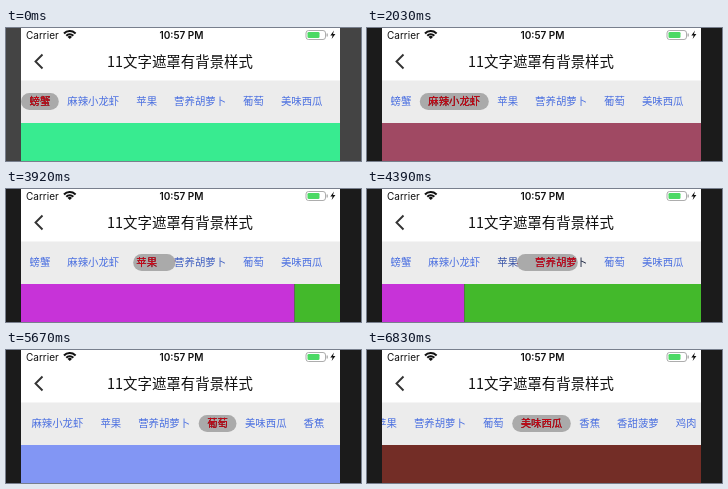
These frames come from a looping animation (355x133 px, 7.43 s). An HTML page with a canvas:

```html
<!DOCTYPE html>
<html lang="zh-CN">
<head>
<meta charset="utf-8">
<style>
  html, body { margin: 0; width: 100%; height: 100%; overflow: hidden; background: #1b1b1b; }
  canvas { display: block; width: 355px; height: 133px; }
</style>
</head>
<body>
<canvas></canvas>
<script>
const W = 355, H = 133, LOOP = 7430, TICK = 58;
const LEFT = 15, RIGHT = 334, VIEW = RIGHT - LEFT;
const CJK = '"Noto Sans CJK SC", "Noto Sans CJK", sans-serif';
const LATIN = 'Inter, sans-serif';
const PAGES = ['#38eb90', '#a04963', '#c733d8', '#43b92b', '#8296f4', '#732d26'];
const BLUE = [74, 111, 224];
const FONT = 10.4, GAP = 17, PAD = 8.5;

let nextX = LEFT + PAD;
const tabs = ['螃蟹', '麻辣小龙虾', '苹果', '营养胡萝卜', '葡萄', '美味西瓜', '香蕉', '香甜菠萝', '鸡肉']
  .map(label => {
    const tab = { label, x: nextX, w: label.length * FONT };
    nextX += tab.w + GAP;
    return tab;
  });

// Each move: start, steps, from, to, ease-out power
const swipes = [
  [1320, 5, 0, 0.31, 1.2], [1740, 6, 0.31, 1, 2.2],
  [2328, 3, 1, 1.364, 1.2], [3270, 1, 1.364, 1.42, 1], [3330, 6, 1.42, 2, 2.2],
  [3920, 3, 2, 2.37, 1.2], [4330, 6, 2.37, 3, 2.2],
  [4848, 5, 3, 3.32, 1.2], [5320, 6, 3.32, 4, 2.2],
  [5848, 5, 4, 4.33, 1.2], [6200, 6, 4.33, 5, 2.2]
];
const centered = i => tabs[i].x + tabs[i].w / 2 - (LEFT + RIGHT) / 2;
const scrolls = [
  [4670, 6, 0, centered(3), 2], [5660, 6, centered(3), centered(4), 2],
  [6540, 6, centered(4), centered(5), 2]
];

function valueAt(moves, t) {
  const move = moves.findLast(m => t >= m[0]);
  if (!move) return 0;
  const [start, steps, from, to, power] = move;
  const u = Math.min(1, (Math.floor((t - start) / TICK) + 1) / steps);
  return from + (to - from) * (1 - (1 - u) ** power);
}

const canvas = document.querySelector('canvas');
const ctx = canvas.getContext('2d');
const scale = window.devicePixelRatio || 1;
canvas.width = W * scale;
canvas.height = H * scale;

function rect(x, y, w, h, color) {
  ctx.fillStyle = color;
  ctx.fillRect(x, y, w, h);
}

function text(str, x, y, font, color, align = 'left') {
  ctx.font = font;
  ctx.textAlign = align;
  ctx.fillStyle = color;
  ctx.fillText(str, x, y);
}

function line(points, width, color) {
  ctx.beginPath();
  points.forEach(([x, y]) => ctx.lineTo(x, y));
  ctx.lineWidth = width;
  ctx.strokeStyle = color;
  ctx.stroke();
}

function pill(x, y, w, h, r) {
  ctx.beginPath();
  ctx.roundRect(x, y, w, h, r);
}

function drawHeader() {
  rect(LEFT, 0, VIEW, 53, '#fff');
  text('Carrier', 20, 10.5, `10px ${LATIN}`, '#111');
  text('10:57 PM', 175.5, 10.5, `600 10px ${LATIN}`, '#111', 'center');

  for (const r of [1.5, 4.8, 8]) {
    ctx.beginPath();
    ctx.arc(63.8, 11, r, -Math.PI * 0.76, -Math.PI * 0.24);
    ctx.lineWidth = r < 2 ? 3 : 2;
    ctx.strokeStyle = '#111';
    ctx.stroke();
  }

  pill(300, 2.5, 19.5, 9, 2.5);
  ctx.lineWidth = 0.8;
  ctx.strokeStyle = '#999';
  ctx.stroke();
  pill(301.5, 4, 12, 6, 1.3);
  ctx.fillStyle = '#4cd964';
  ctx.fill();
  rect(320.6, 5.5, 1.1, 3, '#999');
  ctx.beginPath();
  [[328, 2.5], [324.3, 7.4], [326.6, 7.4], [325.6, 11], [329.4, 6], [327, 6]]
    .forEach(([x, y]) => ctx.lineTo(x, y));
  ctx.fillStyle = '#111';
  ctx.fill();

  line([[36.5, 26.5], [29.5, 33.5], [36.5, 40.5]], 1.9, '#333');
  text('11文字遮罩有背景样式', 174, 39.3, `500 14.45px ${CJK}`, '#111', 'center');
}

function drawTabs(page, offset) {
  rect(LEFT, 52.5, VIEW, 42.5, '#ececec');
  const i = Math.floor(page), f = page - i;
  const mix = key => tabs[i][key] + (tabs[i + 1][key] - tabs[i][key]) * f;
  const drawLabels = color => tabs.forEach((tab, n) =>
    text(tab.label, tab.x - offset, 77.3, `500 ${FONT}px ${CJK}`, color(n)));

  pill(mix('x') - PAD - offset, 65, mix('w') + 2 * PAD, 17, 8.5);
  ctx.fillStyle = '#aaa';
  ctx.fill();
  drawLabels(n => {
    const rest = Math.min(1, Math.abs(n - page));
    return `rgb(${BLUE.map(c => c * rest)})`;
  });
  ctx.save();
  pill(mix('x') - PAD - offset, 65, mix('w') + 2 * PAD, 17, 8.5);
  ctx.clip();
  drawLabels(() => '#e60012');
  ctx.restore();
}

function draw(t) {
  const page = valueAt(swipes, t);
  const shade = Math.round(68 - valueAt([[1320, 5, 0, 41, 1]], t));
  ctx.setTransform(scale, 0, 0, scale, 0, 0);
  rect(0, 0, W, H, `rgb(${shade},${shade},${shade})`);
  ctx.save();
  ctx.beginPath();
  ctx.rect(LEFT, 0, VIEW, H);
  ctx.clip();
  drawHeader();
  drawTabs(page, valueAt(scrolls, t));
  PAGES.forEach((color, n) => rect(LEFT + (n - page) * VIEW, 95, VIEW, H - 95, color));
  ctx.restore();
}

function frame() {
  draw(performance.now() % LOOP);
  requestAnimationFrame(frame);
}
frame();
</script>
</body>
</html>
```
